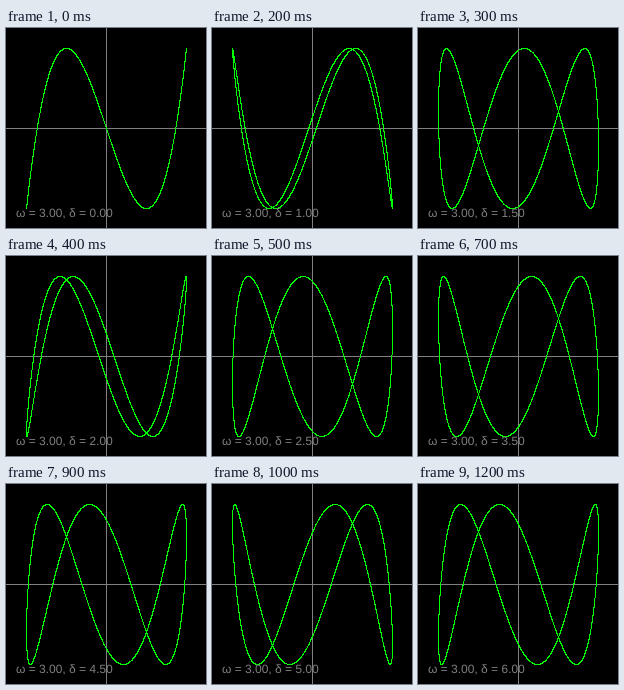
A matplotlib script for the animation above (1.3 s loop, 200 by 200 pixels).

```python
import numpy as np
import matplotlib.pyplot as plt
from matplotlib.animation import FuncAnimation

SIZE, CENTER, RADIUS = 200, 100, 80
FRAMES, INTERVAL = 13, 100
OMEGA, DELTA_STEP = 3.0, 0.5
GRAY, GREEN = (128, 128, 128), (0, 255, 0)

plt.rcParams.update({
    "toolbar": "None",
    "font.family": "Liberation Sans",
    "text.hinting": "none",
})


def lissajous(delta, samples=6000):
    """Pixel columns and rows of a densely dotted curve."""
    t = np.linspace(0, 2 * np.pi, samples, endpoint=False)
    x = CENTER + RADIUS * np.sin(t + delta)
    y = CENTER + RADIUS * np.sin(OMEGA * t)
    return np.rint(x).astype(int), np.rint(y).astype(int)


def render(delta):
    canvas = np.zeros((SIZE, SIZE, 3), np.uint8)
    canvas[CENTER, :] = GRAY
    canvas[:, CENTER] = GRAY
    cols, rows = lissajous(delta)
    canvas[rows, cols] = GREEN
    return canvas


fig = plt.figure(figsize=(SIZE / 100, SIZE / 100), dpi=100, facecolor="black")
picture = fig.figimage(render(0), origin="upper")
label = fig.text(10 / SIZE, 11 / SIZE, "", color="#808080",
                 fontsize=12 * 72 / 100, va="baseline")


def update(frame):
    delta = frame * DELTA_STEP
    picture.set_data(render(delta))
    label.set_text(f"ω = {OMEGA:.2f}, δ = {delta:.2f}")
    return picture, label


anim = FuncAnimation(fig, update, frames=FRAMES, interval=INTERVAL,
                     repeat=True, repeat_delay=0)
plt.show()
```
